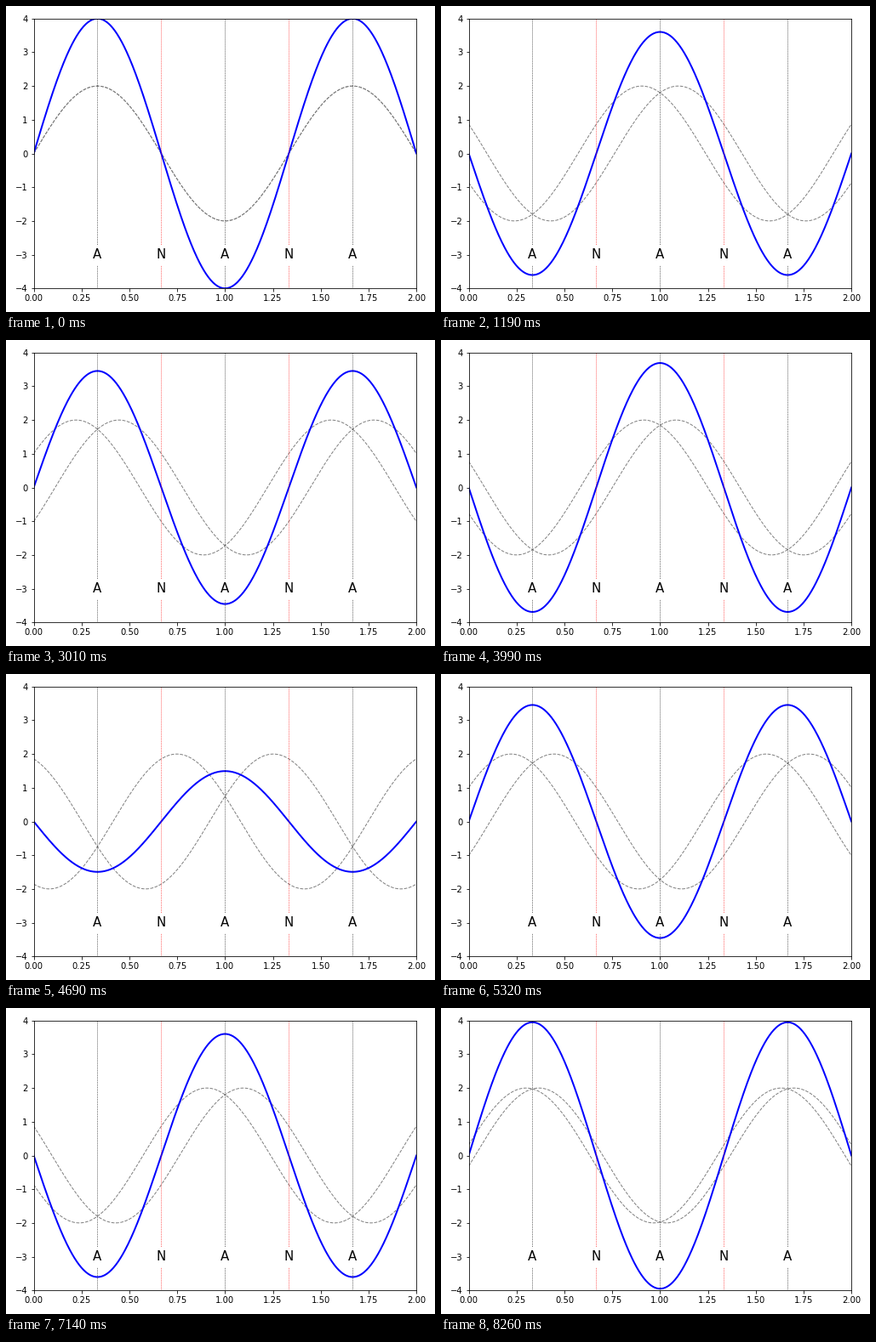
A matplotlib script that plays this animation: 504 by 360 pixels, repeating every 8330 ms.

```python
import numpy as np
import matplotlib.pyplot as plt
from matplotlib.animation import FuncAnimation

FRAMES, INTERVAL = 119, 70
CYCLES = 3          # oscillations per loop
AMP = 2
K = 1.5 * np.pi     # wavelength of 4/3

plt.rcParams["font.family"] = "DejaVu Sans"
fig, ax = plt.subplots(figsize=(7, 5), dpi=72)
ax.set_xlim(0, 2)
ax.set_ylim(-4, 4)

x = np.linspace(0, 2, 500)
right, = ax.plot(x, 0 * x, "--", color="gray", lw=1)
left, = ax.plot(x, 0 * x, "--", color="gray", lw=1)
total, = ax.plot(x, 0 * x, "b", lw=2)

# antinodes and nodes alternate every quarter wavelength
for n in range(1, 6):
    name, color = ("A", "black") if n % 2 else ("N", "red")
    ax.axvline(n / 3, color=color, ls=":", lw=0.75)
    ax.text(n / 3, -3, name, size=15, ha="center", va="center",
            backgroundcolor="white")

fig.tight_layout()


def update(i):
    phase = 2 * np.pi * CYCLES * i / FRAMES
    y1 = AMP * np.sin(K * x - phase)
    y2 = AMP * np.sin(K * x + phase)
    right.set_ydata(y1)
    left.set_ydata(y2)
    total.set_ydata(y1 + y2)
    return right, left, total


anim = FuncAnimation(fig, update, frames=FRAMES, interval=INTERVAL,
                     repeat=True, repeat_delay=0)
plt.show()
```
